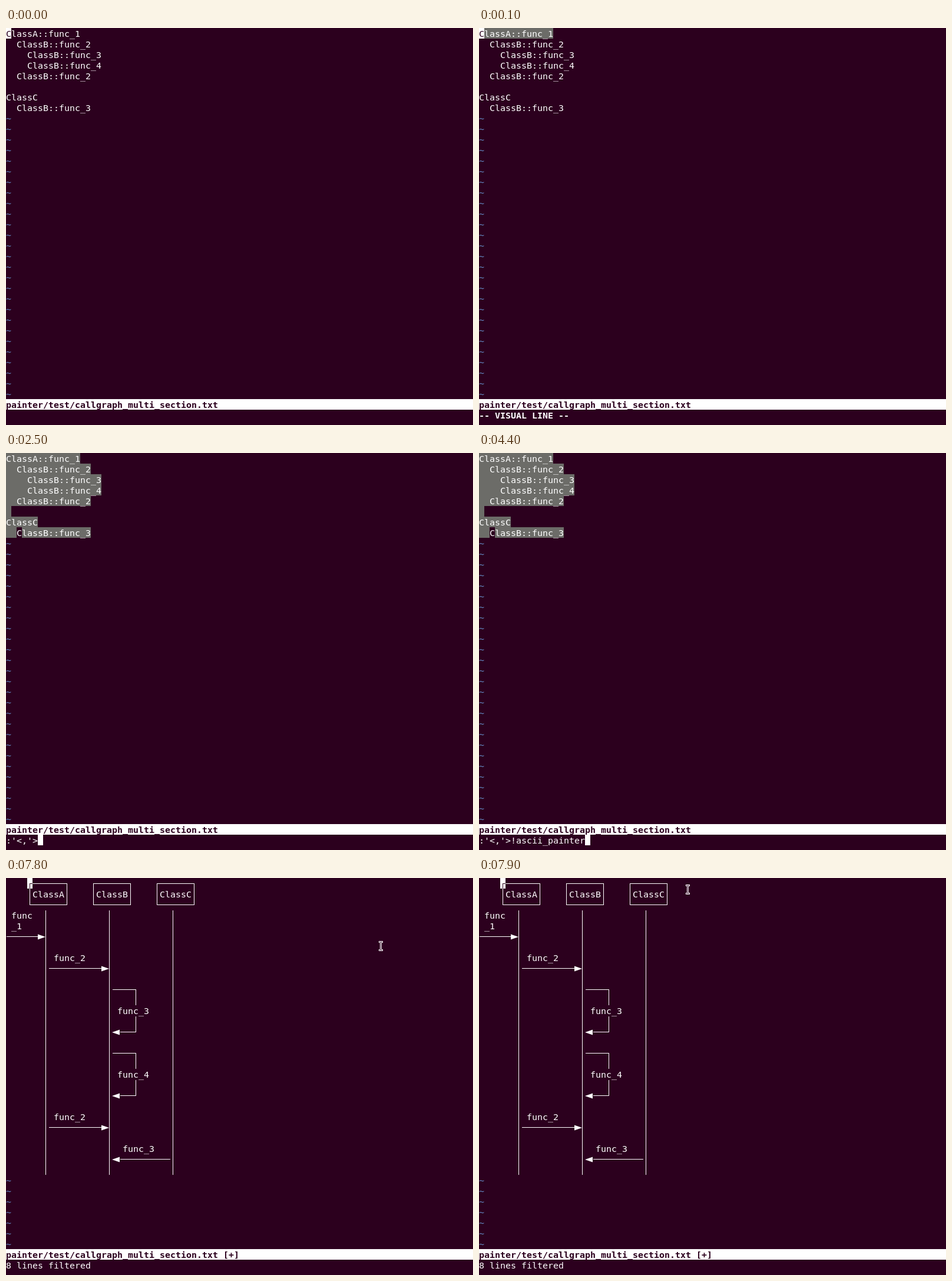
An HTML page for the animation above (8000 ms loop, 793 by 674 pixels).

```html
<!DOCTYPE html>
<html lang="en">
<head>
<meta charset="utf-8">
<title>Call graph in a terminal editor</title>
<style>
  html, body { margin: 0; width: 100%; height: 100%; overflow: hidden; background: #2c001e; }
  svg { display: block; }
  text { font: 14.95px "DejaVu Sans Mono", monospace; white-space: pre; }
  .bold { font-weight: bold; }
  .line { fill: none; stroke: #fff; shape-rendering: crispEdges; }
</style>
</head>
<body>
<svg id="stage" width="793" height="674" viewBox="0 0 793 674"></svg>
<script>
const CELL = 9, ROW = 18, BASELINE = 15, LOOP = 8000;
const BG = '#2c001e', FG = '#fff', SELECTED = '#6c6c68', TILDE = '#6488c4';
const STATUS_ROW = 35, COMMAND_ROW = 36;
const FILE = 'painter/test/callgraph_multi_section.txt';
const SOURCE = [
  'ClassA::func_1',
  '  ClassB::func_2',
  '    ClassB::func_3',
  '    ClassB::func_4',
  '  ClassB::func_2',
  '',
  'ClassC',
  '  ClassB::func_3'
];
const stage = document.getElementById('stage');

const escapeText = s => s.replace(/&/g, '&amp;').replace(/</g, '&lt;').replace(/>/g, '&gt;');

const rect = (x, y, w, h, fill) =>
  `<rect x="${x}" y="${y}" width="${w}" height="${h}" fill="${fill}"/>`;

const cells = (col, row, count, fill) => rect(col * CELL, row * ROW, count * CELL, ROW, fill);

// Every character sits on the terminal grid.
function write(content, col, row, fill = FG, style = '') {
  const body = content.trimStart();
  if (!body) return '';
  const start = col + content.length - body.length;
  const xs = [...body].map((_, i) => (start + i) * CELL).join(' ');
  return `<text class="${style}" x="${xs}" y="${row * ROW + BASELINE}" fill="${fill}">${escapeText(body)}</text>`;
}

const line = (d, color = FG) =>
  `<path class="line" style="stroke:${color}" transform="translate(.5 .5)" d="${d}"/>`;

const head = (tip, y, dir) =>
  `<path fill="${FG}" d="M${tip} ${y + 1}l${-13 * dir} -4.5v9z"/>`;

function tildes(first) {
  let out = '';
  for (let row = first; row < STATUS_ROW; row++) out += write('~', 0, row, TILDE);
  return out;
}

const status = name =>
  rect(0, STATUS_ROW * ROW, 793, ROW, FG) + write(name, 0, STATUS_ROW, BG, 'bold');

function cursor(col, row, char = '', back = FG, fore = BG) {
  return cells(col, row, 1, back) + write(char, col, row, fore);
}

function editor(selectedRows) {
  const selection = SOURCE.slice(0, selectedRows)
    .map((s, row) => cells(0, row, Math.max(1, s.length), SELECTED)).join('');
  return selection + SOURCE.map((s, row) => write(s, 0, row)).join('') +
    tildes(SOURCE.length) + status(FILE);
}

const visualMode = write('-- VISUAL LINE --', 0, COMMAND_ROW, FG, 'bold');

const prompt = command => editor(SOURCE.length) + cursor(2, 7, 'C', BG, FG) +
  write(command, 0, COMMAND_ROW) + cursor(command.length, COMMAND_ROW);

function participant(name, i) {
  const x = 40 + i * 108;
  return line(`M${x} 9h63v36h-63z`) + write(name, 5 + i * 12, 1) + line(`M${x + 27} 54V503.5`);
}

const call = (from, tip, y) => {
  const dir = Math.sign(tip - from);
  return line(`M${from} ${y}H${tip - 13 * dir}`) + head(tip, y, dir);
};

const selfCall = (name, row) => {
  const y = row * ROW;
  return line(`M180 ${y - 27}H220V${y - .5}M220 ${y + 18}V${y + 45}H193`) +
    head(180, y + 45, -1) + write(name, 21, row);
};

function diagram() {
  return ['ClassA', 'ClassB', 'ClassC'].map(participant).join('') +
    write('func', 1, 3) + write('_1', 1, 4) + call(0, 67, 99) +
    write('func_2', 9, 7) + call(72, 175, 153) +
    selfCall('func_3', 12) + selfCall('func_4', 18) +
    write('func_2', 9, 22) + call(72, 175, 423) +
    write('func_3', 22, 25) + call(278, 180, 477) +
    cells(4, 0, 1, FG) + line('M40 17.5V9H44.5', BG) +
    tildes(28) + status(FILE + ' [+]') + write('8 lines filtered', 0, COMMAND_ROW);
}

const pointer = (x, y) => `<g transform="translate(${x} ${y})" shape-rendering="crispEdges">` +
  rect(0, 0, 7, 3, FG) + rect(0, 14, 7, 3, FG) + rect(2, 2, 3, 13, FG) +
  rect(1, 1, 2, 1, BG) + rect(4, 1, 2, 1, BG) + rect(3, 2, 1, 13, BG) +
  rect(1, 15, 2, 1, BG) + rect(4, 15, 2, 1, BG) + '</g>';

const scenes = [
  [0, editor(0) + cursor(0, 0, 'C')],
  [100, editor(1) + cursor(0, 0, 'C') + visualMode],
  [1900, editor(SOURCE.length) + cursor(2, 7, 'C') + visualMode],
  [2500, prompt(":'<,'>")],
  [3900, prompt(":'<,'>!")],
  [4400, prompt(":'<,'>!ascii_painter")],
  [5200, diagram()],
  [7800, diagram() + pointer(633, 107)],
  [7900, diagram() + pointer(351, 11)]
];

let shown;
const start = performance.now();

function render(time) {
  const scene = scenes.findLast(([from]) => from <= time);
  if (scene === shown) return;
  shown = scene;
  stage.innerHTML = rect(0, 0, 793, 674, BG) + scene[1];
}

function tick() {
  render((performance.now() - start) % LOOP);
  requestAnimationFrame(tick);
}
tick();
</script>
</body>
</html>
```
